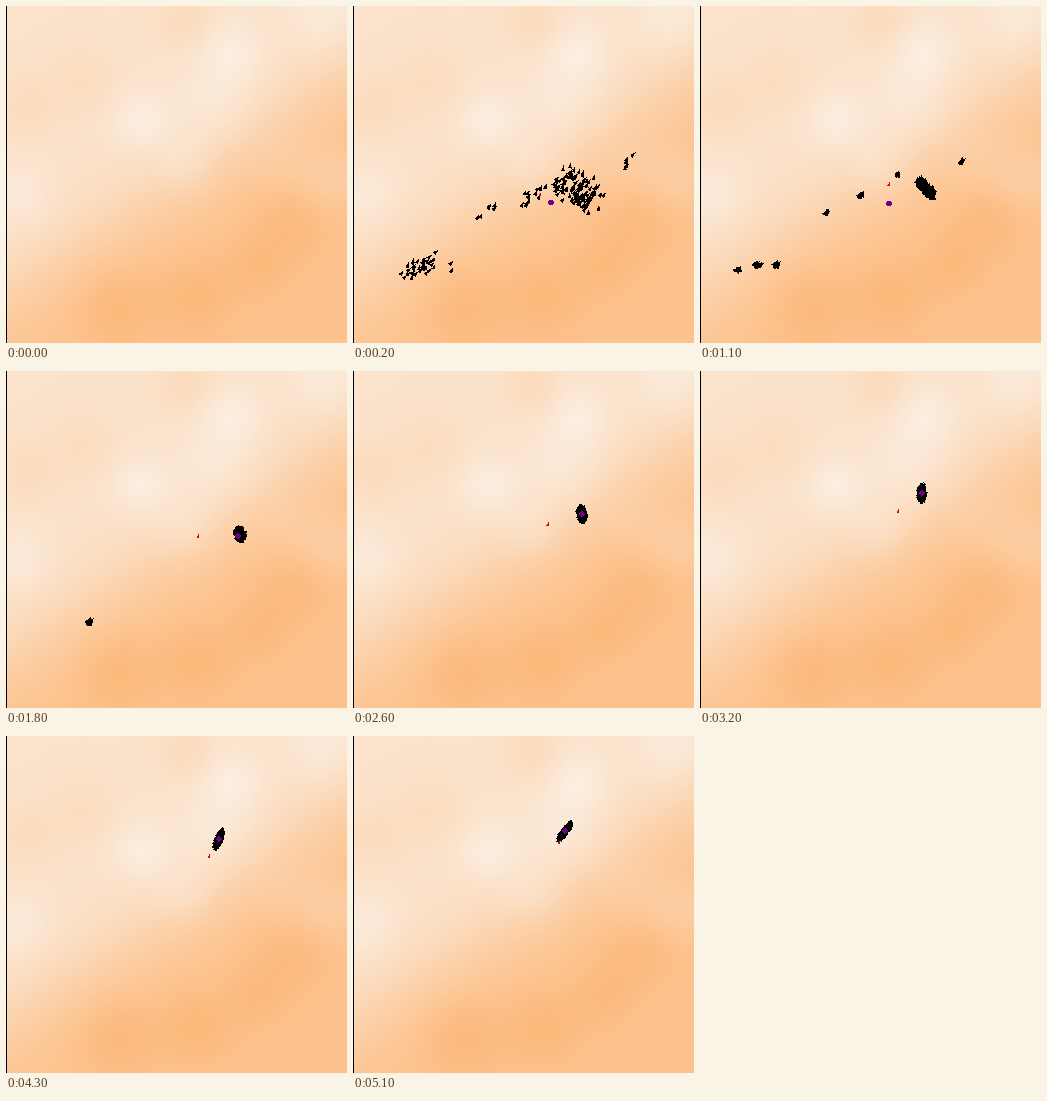
Write an HTML page with a canvas that moves like this. It is 341 by 337 pixels and loops after 5300 ms.

```html
<!DOCTYPE html>
<html lang="en">
<head>
<meta charset="utf-8">
<title>Flock</title>
<style>
  html, body { margin: 0; width: 100%; height: 100%; overflow: hidden; }
  canvas, svg { position: absolute; left: 0; top: 0; width: 100%; height: 100%; display: block; }
</style>
</head>
<body>
<canvas id="ground" width="341" height="337"></canvas>
<svg viewBox="0 0 341 337" shape-rendering="crispEdges">
  <path id="birds" fill="#000"/>
  <path id="guide" d="M-1.5 2L1.5 2L1 -2Z" fill="#d40808"/>
  <circle id="mean" r="2.8" fill="#70008a"/>
  <rect width="1" height="337" fill="#000"/>
</svg>
<script>
const LOOP = 5300;
const SETTLED = 1800;
const RAD = Math.PI / 180;
const HEADING = -60;
const LOW = [251, 238, 225], HIGH = [252, 182, 118];

// Hills and hollows on the slope: x, y, radius, strength
const HILLS = [
  [135, 115, 20, -0.2], [210, 100, 30, -0.15], [225, 45, 22, -0.18], [320, 10, 26, -0.16],
  [12, 190, 22, -0.15], [180, 160, 22, -0.15], [325, 175, 22, -0.18], [280, 160, 24, -0.1],
  [180, 15, 20, 0.15], [75, 75, 24, 0.11], [20, 100, 22, 0.13],
  [285, 215, 28, 0.15], [250, 260, 22, 0.14], [190, 290, 26, 0.18], [110, 300, 28, 0.18]
];

function groundLevel(x, y) {
  const slope = 0.2 + 0.58 / (1 + Math.exp((288 - y - 0.65 * x) / 28));
  return HILLS.reduce((level, [hx, hy, r, strength]) =>
    level + strength * Math.exp(-((x - hx) ** 2 + (y - hy) ** 2) / (2 * r * r)), slope);
}

function paintGround() {
  const ctx = document.getElementById('ground').getContext('2d');
  const { width, height } = ctx.canvas;
  const image = ctx.createImageData(width, height);
  let i = 0;
  for (let y = 0; y < height; y++) {
    for (let x = 0; x < width; x++) {
      const level = Math.min(1, Math.max(0, groundLevel(x, y)));
      for (let c = 0; c < 3; c++) image.data[i++] = LOW[c] + (HIGH[c] - LOW[c]) * level;
      image.data[i++] = 255;
    }
  }
  ctx.putImageData(image, 0, 0);
}

function seeded(seed) {
  return () => {
    seed = (seed * 16807) % 2147483647;
    return seed / 2147483647;
  };
}
const random = seeded(4711);

// Position on a path of [time, x, y] points
function along(path, t) {
  const n = Math.max(1, path.findIndex(point => point[0] >= t));
  const [t0, x0, y0] = path[n - 1], [t1, x1, y1] = path[n];
  const f = (t - t0) / (t1 - t0);
  return [x0 + (x1 - x0) * f, y0 + (y1 - y0) * f];
}

const MAIN_PATH = [[100, 216, 194], [1100, 226, 182], [SETTLED, 234, 163], [2400, 230, 146],
  [3200, 222, 122], [4300, 213, 103], [5100, 212, 95]];
const GUIDE_PATH = [[100, 186.5, 189.5], [1100, 188.5, 178], [5100, 206, 106]];
const MEAN_PATH = [[100, 199, 196.5], [1100, 189, 197.5], [SETTLED, 232, 165]];

function makeBirds(count) {
  return Array.from({ length: count }, () => {
    const radius = Math.sqrt(random()), angle = random() * 2 * Math.PI;
    return {
      u: radius * Math.cos(angle),
      v: radius * Math.sin(angle),
      turn: (random() - 0.5) * 50,
      drift: random(),
      jitter: random() - 0.5
    };
  });
}

// The main flock turns steadily while it contracts, then stretches
function mainShape(t) {
  const gathering = Math.max(0, (SETTLED - t) / 1300);
  const leaving = Math.max(0, (t - SETTLED) / 3300);
  const [x, y] = along(MAIN_PATH, t);
  return {
    x, y,
    length: 7 + 13 * gathering ** 1.3 + 4 * leaving,
    width: 4.6 - 1.8 * leaving,
    axis: 25 + 0.02 * t
  };
}

// Stragglers drift up together: x and y at 500 ms, sideways drift, size, time of loss
const STRAGGLERS = [
  [41, 270, -3, 6, 1200], [57, 265, 1, 13, 1400], [70, 265, 6, 13, 2200], [91, 263, 0, 2, 900],
  [125, 213, 1, 7, 1600], [164, 195, -4, 9, 1400], [176, 194, -4, 5, 900],
  [201, 175, -3, 6, 1500], [265, 162, -3, 6, 1700]
];

const flocks = [
  { end: LOOP, birds: makeBirds(100), shape: mainShape },
  ...STRAGGLERS.map(([x, y, dx, size, end]) => ({
    end,
    birds: makeBirds(size),
    shape: t => {
      const f = (t - 500) / 600;
      const length = Math.sqrt(size);
      return { x: x + dx * f, y: y - 6.5 * f, length, width: length * 0.7, axis: 0 };
    }
  }))
];

function rotate(u, v, degrees) {
  const c = Math.cos(degrees * RAD), s = Math.sin(degrees * RAD);
  return [u * c - v * s, u * s + v * c];
}

function triangle(x, y, degrees) {
  const corners = [[3.4, 0], [-2.4, 1.9], [-2.4, -1.9]].map(([u, v]) => {
    const [dx, dy] = rotate(u, v, degrees);
    return `${(x + dx).toFixed(2)} ${(y + dy).toFixed(2)}`;
  });
  return `M${corners.join('L')}Z`;
}

function flockPath(t) {
  const spread = Math.max(0, (500 - t) / 400) ** 1.5;
  let d = '';
  for (const { end, birds, shape } of flocks) {
    if (t >= end) continue;
    const { x, y, length, width, axis } = shape(t);
    for (const { u, v, turn, drift, jitter } of birds) {
      const [dx, dy] = rotate(u * length, v * width, axis);
      d += triangle(
        x + dx + spread * (drift * 27 + jitter * 6),
        y + dy + spread * (jitter * 14 - drift * 28),
        HEADING + turn);
    }
  }
  return d;
}

// Steps of 100 ms at first, then about 20 uneven steps on the same grid
function stepTime(phase) {
  const tick = Math.floor(phase / 100) * 100;
  if (tick <= SETTLED) return tick;
  const n = Math.floor((tick - SETTLED) / 165);
  return SETTLED + Math.ceil(n * 1.65) * 100;
}

const [birds, guide, mean] = ['birds', 'guide', 'mean'].map(id => document.getElementById(id));
const place = (part, [x, y]) => part.setAttribute('transform', `translate(${x} ${y})`);
let shown = -1;

function render(time) {
  const t = stepTime(time % LOOP);
  if (t === shown) return;
  shown = t;
  for (const part of [birds, guide, mean]) part.style.display = t ? '' : 'none';
  if (!t) return;
  birds.setAttribute('d', flockPath(t));
  place(guide, along(GUIDE_PATH, t));
  place(mean, along(t <= SETTLED ? MEAN_PATH : MAIN_PATH, t));
}

paintGround();
const start = performance.now();
function tick() {
  render(performance.now() - start);
  requestAnimationFrame(tick);
}
tick();
</script>
</body>
</html>
```
